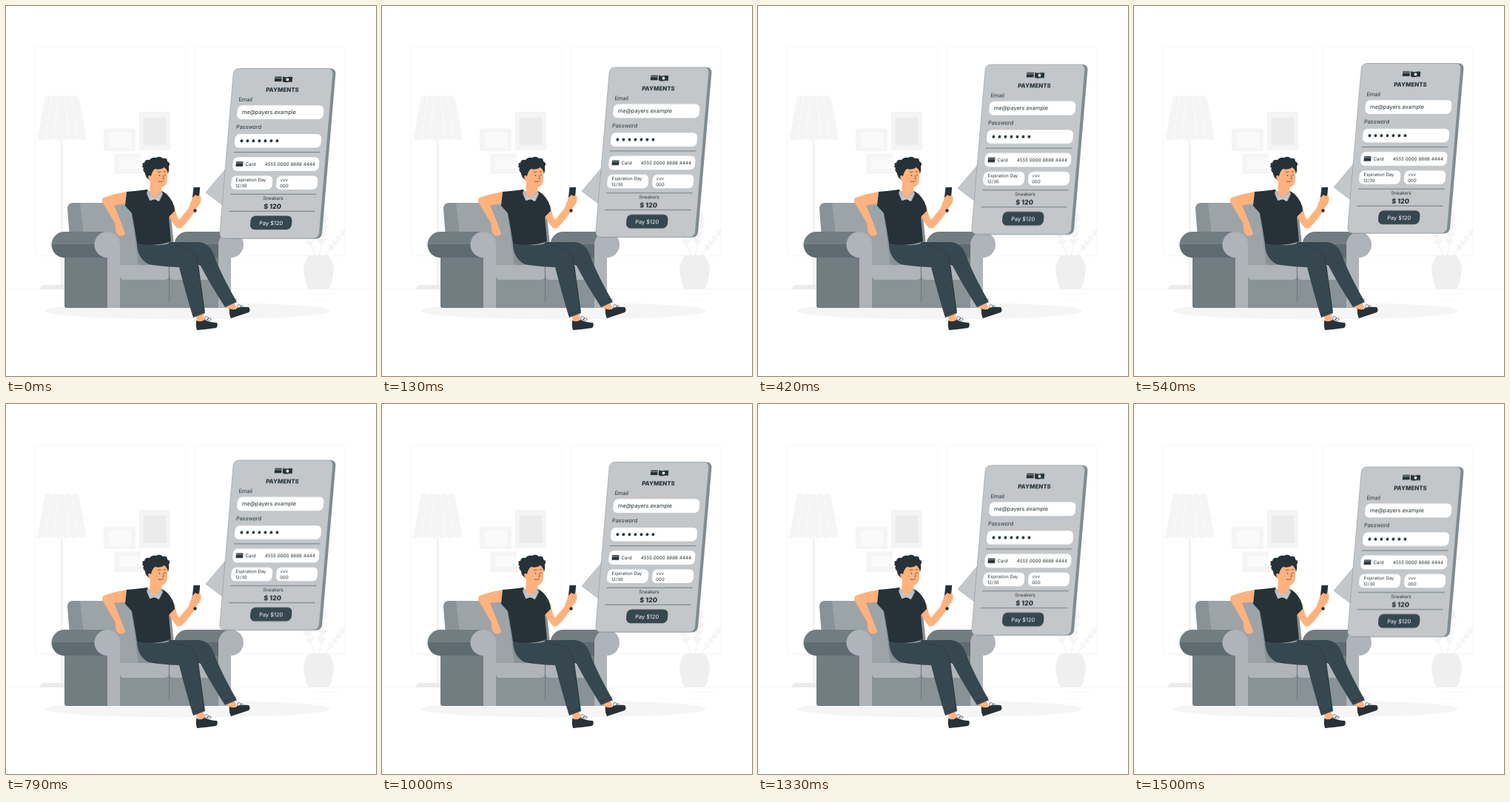
An HTML page without scripts for the animation above (1540 ms loop, 500 px wide and 500 px high).

```html
<!DOCTYPE html>
<html lang="en">
<head>
<meta charset="utf-8">
<title>Paying from the sofa</title>
<style>
  html, body { margin: 0; width: 100%; height: 100%; overflow: hidden; background: #fff; }
  svg { display: block; width: 100vw; height: 100vh; }
  .pale { fill: #f5f5f5; }
  .mist { fill: #ebebeb; }
  .hairline { fill: none; stroke: #f7f7f7; }
  .ink { fill: #263238; }
  .slate { fill: #37474f; }
  .skin { fill: #ffb27d; }
  .dark { fill: #727d82; }
  .deep { fill: #5e6b71; }
  .mid { fill: #899297; }
  .light { fill: #aeb4b9; }
  .stroke { fill: none; stroke: #263238; stroke-width: .6; stroke-linecap: round; }
  .field { fill: #fff; }
  .rule { stroke: #4d5a61; stroke-width: .7; }
  .words { font-family: Inter, sans-serif; font-size: 7.4px; fill: #263238; }
  .bold { font-weight: 800; }
  .small { font-size: 6.3px; }
  .tiny { font-size: 6px; }
  .centred { text-anchor: middle; }
  #bubble { animation: hover 1540ms linear infinite; }
  @keyframes hover {
    0% { transform: translateY(0); }
    47% { transform: translateY(-9.6px); }
    97% { transform: translateY(.4px); }
    100% { transform: translateY(0); }
  }
</style>
</head>
<body>
<svg viewBox="0 0 500 500">
  <defs>
    <g id="leaf"><ellipse cx="-4" cy="-3" rx="5" ry="2.4" transform="rotate(38)"/><ellipse cx="4" cy="-3" rx="5" ry="2.4" transform="rotate(-38)"/></g>
    <g id="sprig">
      <path d="M0 0V-58" stroke="#f3f3f3" stroke-width="1.5"/>
      <use href="#leaf" y="-18"/><use href="#leaf" y="-28"/><use href="#leaf" y="-38"/><use href="#leaf" y="-48"/>
      <ellipse cy="-58" rx="2.6" ry="5"/>
    </g>
    <g id="bank-card">
      <rect class="ink" width="9.6" height="6.6" rx=".6"/>
      <path d="M0 1.9H9.6" stroke="#c3c7ca" stroke-width=".7"/>
    </g>
  </defs>

  <g id="room">
    <rect class="hairline" x="39.5" y="55.5" width="203" height="282" rx="2"/>
    <rect class="hairline" x="255" y="55.5" width="203" height="282" rx="2"/>
    <path d="M0 382.5H500M416 389.5H449M417 398H432" stroke="#f5f5f5"/>
    <ellipse class="pale" cx="245.5" cy="412" rx="193" ry="11.5"/>

    <path class="pale" d="M132 165.5h43V196h-43ZM180 143h42v52h-42ZM146 199.5h36V227h-36Z"/>
    <path fill="#fafafa" d="M139 170h30v21h-30ZM153 205h29v15h-29Z"/>
    <path class="mist" d="M186 150.5h30.5V188H186Z"/>

    <path class="pale" d="M73.3 180h3.6v198h-3.6Z"/>
    <path class="mist" d="M46 383q0-6 6-6h46q6 0 6 6Z"/>
    <path class="pale" d="M53 123q4-4 8 0 5-4 9 0 5-4 10 0 5-4 9 0 5-4 9 0l11 57q-6 2-11-1-5 4-11 0-6 4-12 0-6 4-11 0-6 4-11 0-5 4-11 1Z"/>
    <path d="M61 123l-7 56M70 123l-5 56M80 123l5 56M89 123l8 56" fill="none" stroke="#fafafa" stroke-width="1.3"/>

    <g fill="#f5f5f5">
      <use href="#sprig" transform="translate(418 341) rotate(-18)"/>
      <use href="#sprig" transform="translate(423 341) rotate(8)"/>
      <use href="#sprig" transform="translate(428 341) rotate(38) scale(.8)"/>
    </g>
    <path fill="#efefef" d="M410 337h25q8 9 8 18-1 17-7 28h-27q-6-11-7-28 0-9 8-18Z"/>
  </g>

  <g id="sofa">
    <path class="mid" d="M83 274q0-8 8-8h50l22 85H89Z"/>
    <path class="mid" d="M160 266h50q10 0 12 9l8 76h-62Z"/>
    <path fill="#9da4a8" d="M100 266h60q8 0 9 8l10 77h-69Z"/>
    <path class="mid" d="M150 350h142v58H150Z"/>
    <path class="dark" d="M232 325h56v27h-56Z"/>
    <path class="light" d="M154 350h62q4 0 4 4v10q0 6-6 6h-54q-6 0-6-6ZM225 350h62v20h-60q-6 0-6-6v-10q0-4 4-4Z"/>
    <path class="stroke" d="M220.5 352v48" opacity=".45"/>
    <path class="dark" d="M79 330h62v78H82q-3 0-3-3Z"/>
    <path class="dark" d="M79 305h59v35H79a17.5 17.5 0 0 1 0-35ZM245 305h58v35h-58a17 17 0 0 1 0-35Z"/>
    <path class="deep" d="M62 322h62l14 18H79q-16-1-17-18ZM229 322h60l14 18h-58q-15-1-16-18Z"/>
    <path class="dark" d="M304 330v78h-17v-78Z"/>
    <path class="light" d="M154 322v86h-17v-68a17.3 17.5 0 1 1 17-18ZM304 340v68h-17v-86a17 17.5 0 1 1 17 18Z"/>
  </g>

  <g id="man">
    <path class="skin" d="M295 402l11-5 7 13-8 4ZM256 416l10-2 3 13-10 3Z"/>
    <path class="ink" d="M302 409q7 3 11-1 7-2 15-1 3 4 0 7-12 4-24 8-3-6-2-13ZM257 425q7 3 11-1 9 4 17 4 2 4-1 7-13 2-26 3-2-6-1-13Z"/>
    <path class="stroke" d="M313 408q-1-6 3-4t-1 4q4-5 5-2t-5 2M269 424q-1-6 3-4t-1 4q5-4 6-1t-6 1"/>

    <path class="slate" d="M220 319h42q12 2 18 15 9 26 32 66l-16 7q-20-31-33-56-13-7-43-9Z"/>
    <path class="slate" d="M177 320q30 7 51-1 30 3 32 30l9 66-16 6q-10-32-19-68-25-1-41-4-16-8-16-29Z"/>
    <path class="stroke" d="M228 324q28 1 31 24l9 63M252 417l16-5M295 403l16-7"/>

    <path class="skin" d="M165 251q-17 2-33 8-4 3 0 9l16 27q-1 10 4 15 8 2 9-3l-6-16-9-22 20-2Z"/>
    <path class="skin" d="M219 272l9-2q2 14 6 19l13-16q2-8 6-14l9-3q4 9-3 15-10 17-21 28-4 3-8 0-8-9-11-19Z"/>
    <path class="ink" d="M253.500 245h8.700l-1.600 18-9-1Z"/>
    <path class="skin" d="M251 260l5-5 3 2 3-2q3 5 0 11l-8 5q-4-4-3-11Z"/>
    <circle class="ink" cx="255.500" cy="276.500" r="2.200"/>

    <path class="skin" d="M195 237h15l1 20-8 6-9-8Z"/>
    <path class="ink" d="M163 251q14-1 28-3l10 14 10-12q11 6 16 20l1 7-8 8 3 33q-22 8-46 3-3-20-7-41l-9-10Z"/>
    <path class="stroke" d="M170 279l-4-16M220 285l-4-16" opacity=".5"/>
    <path fill="#b4babe" d="M192 248l8 12-6 3-4-10ZM210 249l-9 11 6 4 5-10Z"/>
    <path fill="#c2c7ca" d="M194 253l7 7 9-7-4 11-5-3-6 2Z"/>

    <path class="skin" d="M193 217h24q2 9 1 18-1 9-8 10-9 0-14-8-5-1-5-6 1-3 4-2Z"/>
    <path class="ink" d="M185 215q-2-3 2-3 1-5 7-4 3-4 9-3 5-3 9 1 6-1 6 4 5 2 2 7 1 5-1 10-1-6-5-9-5 4-13 2-4 4-5 10-2-2-4 0l1 4q-5-3-5-8-4-4-2-7-3-2-1-4Z"/>
    <path class="stroke" d="M205 225q2-1.500 4-.7M213 224q2-1 3 0M212 229l1.500 4-1.500.5M206 237q4 2 7-1"/>
    <circle class="ink" cx="207.500" cy="229" r=".8"/><circle class="ink" cx="215" cy="228.500" r=".7"/>
  </g>

  <g id="bubble">
    <path fill="#c3c7ca" stroke="#8e979c" stroke-width=".5" d="M298 219l-28 33 24 18Z"/>
    <g transform="translate(16.900) skewX(-4.860)">
      <rect x="301" y="84.500" width="135.300" height="230" rx="7" fill="#7f8b91"/>
      <rect x="298" y="84.500" width="134.500" height="229.500" rx="7" fill="#c3c7ca" stroke="#7f8b91" stroke-width=".5"/>

      <use href="#bank-card" x="354.500" y="95.500"/>
      <path class="ink" d="M365.500 95q3 2 6.500 1t6.500 0v7q-3-1-6.500 0t-6.500-1Z"/>
      <circle cx="372" cy="99.300" r="1.900" fill="#fff"/>

      <g class="field">
        <rect x="307.800" y="134.300" width="116.600" height="18.700" rx="6"/>
        <rect x="307.800" y="173" width="116.600" height="18.500" rx="6"/>
        <rect x="307.800" y="204.300" width="116.600" height="18.700" rx="6"/>
        <rect x="307.800" y="229.500" width="55.600" height="18.500" rx="6"/>
        <rect x="368.600" y="229.500" width="55.800" height="18.500" rx="6"/>
      </g>
      <path class="rule" d="M307.800 197.700h116.600M307.800 254.300h116.600M307.800 277.300h116.600"/>
      <rect class="slate" x="338.200" y="283.400" width="56" height="18.800" rx="6.500"/>
      <path d="M317 182.200h49" stroke="#263238" stroke-width="4" stroke-linecap="round" stroke-dasharray="0 8"/>
      <use href="#bank-card" x="312" y="210.200"/>

      <g class="words">
        <text class="bold centred" x="366.200" y="116" style="font-size:7.900px">PAYMENTS</text>
        <text x="308.300" y="129.500">Email</text>
        <text x="314.200" y="146">me@payers.example</text>
        <text x="308" y="166.300">Password</text>
        <text class="small" x="324.700" y="216">Card</text>
        <text class="small" x="419.200" y="216" text-anchor="end">4555 0000 8888 4444</text>
        <text class="tiny" x="313.600" y="237.300">Expiration Day</text>
        <text class="tiny" x="313.600" y="244.800">12/30</text>
        <text class="tiny" x="374" y="237.300">cvv</text>
        <text class="tiny" x="374" y="244.800">000</text>
        <text class="small centred" x="366.200" y="262">Sneakers</text>
        <text class="bold centred" x="366.200" y="274" style="font-size:9px">$ 120</text>
        <text class="centred" x="366.200" y="295.700" fill="#fff">Pay $120</text>
      </g>
    </g>
  </g>
</svg>
</body>
</html>
```
